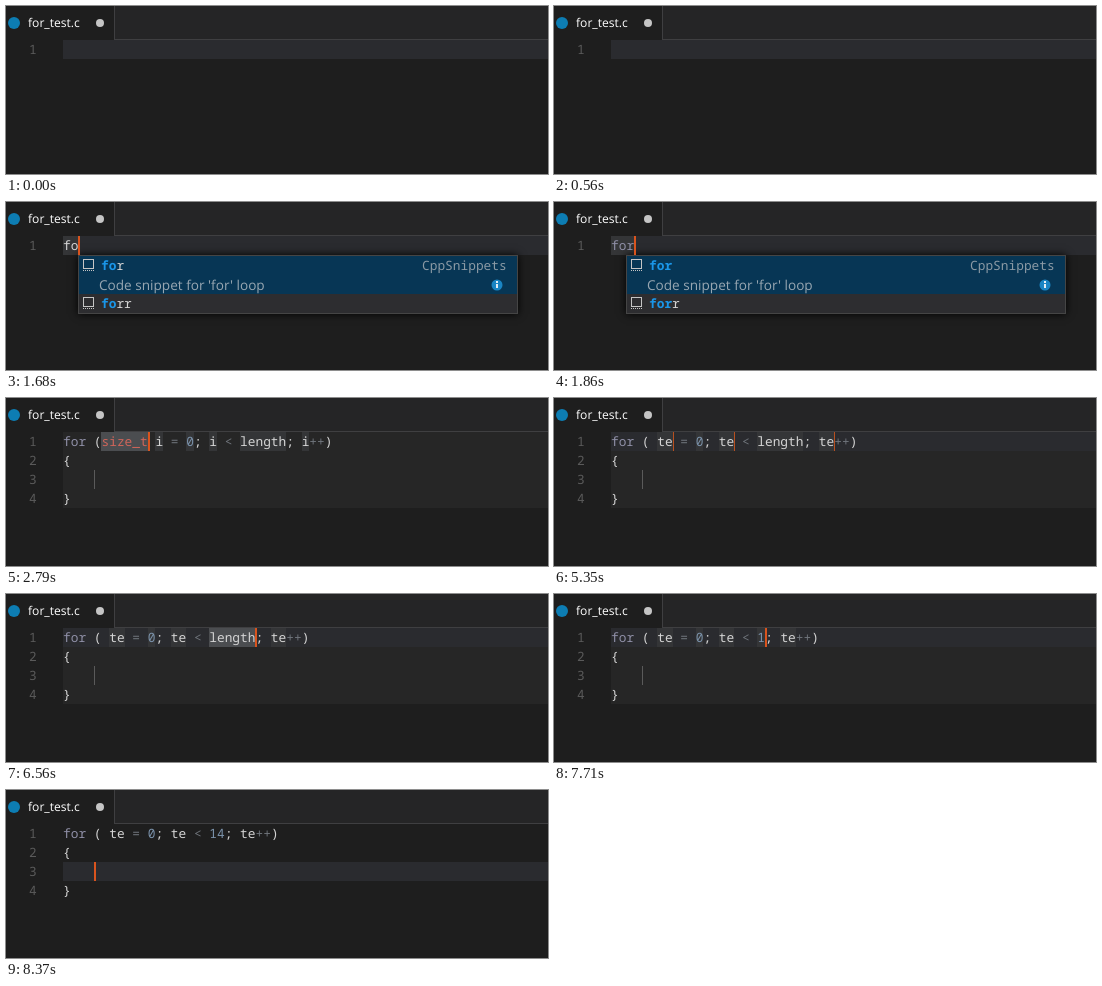
An HTML page with a canvas for the animation above (9.98 s loop, 542 by 168 pixels).

```html
<!DOCTYPE html>
<html lang="en">
<head>
<meta charset="utf-8">
<title>Snippet completion</title>
<style>
  html, body { margin: 0; width: 100%; height: 100%; overflow: hidden; background: #1e1e1e; }
  #stage { position: relative; width: 542px; height: 168px; overflow: hidden; }
  canvas { position: absolute; left: 0; top: 0; }
  .t {
    position: absolute; white-space: pre; color: #d4d4d4; line-height: 19px;
    font-family: "Noto Sans Mono", "DejaVu Sans Mono", monospace; font-size: 12.83px;
    text-rendering: geometricPrecision;
  }
  .ui { font-family: "Open Sans", "Noto Sans", sans-serif; }
  .num { color: #5a5a5a; }
  .key { color: #8f8fa6; }
  .type { color: #cf655a; }
  .lit { color: #7b92ab; }
  .op { color: #70757c; }
  .hit { color: #1a96e8; font-weight: bold; }
  #tab { left: 22px; top: 0; font-size: 12.1px; line-height: 34px; color: #fff; }
  #from { left: 416px; top: 54px; color: #8b9aa5; }
  #about { left: 93px; top: 73px; font-size: 13.6px; color: #98a7b2; }
</style>
</head>
<body>
<div id="stage">
  <canvas id="view" width="542" height="168"></canvas>
  <div class="t ui" id="tab">for_test.c</div>
  <div id="code"></div>
  <div id="popup">
    <div class="t" id="first" style="left:95px;top:54px"></div>
    <div class="t" id="from">CppSnippets</div>
    <div class="t ui" id="about">Code snippet for 'for' loop</div>
    <div class="t" id="second" style="left:95px;top:92px"></div>
  </div>
</div>
<script>
const LOOP = 9980, LEFT = 57, TOP = 34, ROW = 19, CHAR = 7.698;
const $ = id => document.getElementById(id);
const ctx = $('view').getContext('2d');

// Columns: marks and sel are [start, length], carets are single columns.
const steps = [
  { at: 0, text: '' },
  { at: 1680, text: 'fo', marks: [[0, 2]], carets: [2], match: 2 },
  { at: 1810, text: 'for', marks: [[0, 3]], carets: [3], match: 2 },
  { at: 1860, text: 'for', marks: [[0, 3]], carets: [3], match: 3 },
  { at: 2790, text: 'for (size_t i = 0; i < length; i++)', body: true,
    sel: [[5, 6]], marks: [[12, 1], [16, 1], [19, 1], [23, 6], [31, 1]], carets: [11] },
  { at: 3870, text: 'for ( i = 0; i < length; i++)', body: true,
    marks: [[6, 1], [10, 1], [13, 1], [17, 6], [25, 1]], carets: [5] },
  { at: 4280, text: 'for ( i = 0; i < length; i++)', body: true,
    sel: [[6, 1], [13, 1], [25, 1]], marks: [[10, 1], [17, 6]], carets: [7, 14, 26] },
  { at: 4790, text: 'for ( i = 0; i < length; i++)', body: true,
    sel: [[6, 1], [13, 1], [25, 1]], marks: [[10, 1], [17, 6]] },
  { at: 5300, text: 'for ( t = 0; t < length; t++)', body: true, lit: true,
    marks: [[6, 1], [10, 1], [13, 1], [17, 6], [25, 1]], carets: [7, 14, 26], thin: true },
  { at: 5350, text: 'for ( te = 0; te < length; te++)', body: true, lit: true,
    marks: [[6, 2], [11, 1], [14, 2], [19, 6], [27, 2]], carets: [8, 16, 29], thin: true },
  { at: 5860, text: 'for ( te = 0; te < length; te++)', body: true, lit: true,
    marks: [[6, 2], [11, 1], [14, 2], [19, 6], [27, 2]] },
  { at: 6050, text: 'for ( te = 0; te < length; te++)', body: true, lit: true,
    sel: [[19, 6]], marks: [[6, 2], [11, 1], [14, 2], [27, 2]], carets: [25] },
  { at: 7710, text: 'for ( te = 0; te < 1; te++)', body: true, lit: true,
    marks: [[6, 2], [11, 1], [14, 2], [19, 1], [22, 2]], carets: [20] },
  { at: 7890, text: 'for ( te = 0; te < 14; te++)', body: true, lit: true,
    marks: [[6, 2], [11, 1], [14, 2], [19, 2], [23, 2]], carets: [21] },
  { at: 8370, text: 'for ( te = 0; te < 14; te++)', body: true, done: true }
];

function rect(x, y, w, h, color) {
  ctx.fillStyle = color;
  ctx.fillRect(x, y, w, h);
}

function dot(x, y, r, color) {
  ctx.fillStyle = color;
  ctx.beginPath();
  ctx.arc(x, y, r, 0, 7);
  ctx.fill();
}

const colX = col => Math.round(LEFT + col * CHAR);
const rowY = row => TOP + row * ROW;
const span = (cls, text) => `<span class="${cls}">${text}</span>`;
const line = (x, row, html, cls = '') =>
  `<div class="t ${cls}" style="left:${x}px;top:${rowY(row)}px">${html}</div>`;

function paintCode(text) {
  return text.replace(/\bfor\b|size_t|\d+|\+\+|[=<]/g, s => {
    const cls = s === 'for' ? 'key' : s === 'size_t' ? 'type' : /\d/.test(s) ? 'lit' : 'op';
    return span(cls, s.replace('<', '&lt;'));
  });
}

function drawChrome() {
  rect(0, 0, 542, 168, '#1e1e1e');
  rect(108, 0, 434, 34, '#252526');
  rect(108, 0, 1, 34, '#3f3f41');
  rect(108, 33, 434, 1, '#3f3f41');
  dot(8, 17, 6, '#0d7db3');
  dot(94, 17, 4, '#c5c5c5');
}

function drawIcon(x, y) {
  ctx.strokeStyle = '#c5c5c5';
  ctx.lineWidth = 1;
  ctx.strokeRect(x + 0.5, y + 0.5, 10, 9);
  ctx.setLineDash([1, 1]);
  ctx.beginPath();
  ctx.moveTo(x, y + 11.5);
  ctx.lineTo(x + 11, y + 11.5);
  ctx.stroke();
  ctx.setLineDash([]);
}

function drawPopup() {
  ctx.save();
  ctx.shadowColor = '#000';
  ctx.shadowBlur = 8;
  rect(72, 53, 440, 59, '#454545');
  ctx.restore();
  rect(73, 54, 438, 57, '#2d2d30');
  rect(73, 54, 438, 38, '#073655');
  drawIcon(77, 57);
  drawIcon(77, 95);
  dot(491, 83, 5.5, '#1a85c4');
  rect(490, 79, 2, 2, '#e4eef5');
  rect(490, 82, 2, 4, '#e4eef5');
}

function show(s) {
  drawChrome();
  if (s.body && !s.done) rect(LEFT, TOP, 485, 76, '#262626');
  if (!s.body || s.lit) rect(LEFT, TOP, 485, ROW, '#2a2b2f');
  if (s.done) rect(LEFT, rowY(2), 485, ROW, '#2a2b2f');

  const fill = (list, color) => (list || []).forEach(([col, n]) =>
    rect(colX(col), TOP, colX(col + n) - colX(col), ROW, color));
  fill(s.marks, '#343537');
  fill(s.sel, '#4b4d50');

  if (s.match) drawPopup();
  for (const col of s.carets || [])
    rect(colX(col), TOP, s.thin ? 1 : 2, ROW, s.thin ? '#b8501f' : '#d9541e');
  if (s.body) rect(88, rowY(2), s.done ? 2 : 1, ROW, s.done ? '#d9541e' : '#5a5a5a');

  let html = line(LEFT, 0, paintCode(s.text));
  if (s.body) html += line(LEFT, 1, '{') + line(LEFT, 3, '}');
  for (let i = 0; i < (s.body ? 4 : 1); i++) html += line(23, i, i + 1, 'num');
  $('code').innerHTML = html;

  $('popup').hidden = !s.match;
  if (s.match) {
    const hit = word => span('hit', word.slice(0, s.match)) + word.slice(s.match);
    $('first').innerHTML = hit('for');
    $('second').innerHTML = hit('forr');
  }
}

const start = performance.now();
let current;
function tick() {
  const t = (performance.now() - start) % LOOP;
  const next = steps.filter(s => s.at <= t).pop();
  if (next !== current) show(current = next);
  requestAnimationFrame(tick);
}
tick();
</script>
</body>
</html>
```
